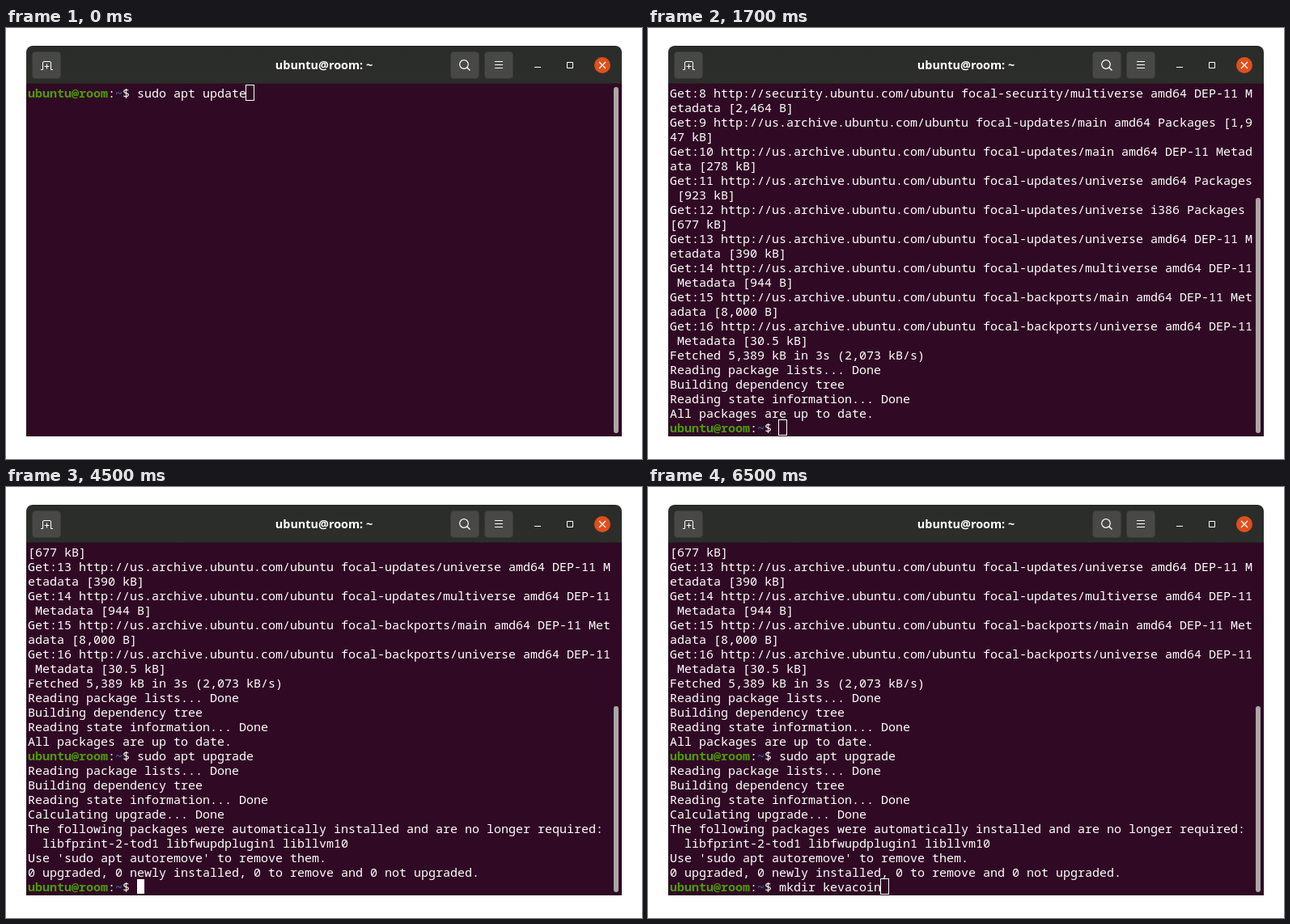
These frames come from a looping animation (786x533 px, 8 s). An HTML page:

```html
<!DOCTYPE html>
<html lang="en">
<head>
<meta charset="utf-8">
<title>Terminal</title>
<style>
  html, body { margin: 0; width: 100%; height: 100%; overflow: hidden; background: #fff; }
  svg { display: block; }
  text { white-space: pre; fill: #fff; }
  #rows text { font: 15px "Noto Sans Mono", "DejaVu Sans Mono", monospace; font-variant-ligatures: none; }
  #rows .user { fill: #4e9a06; font-weight: bold; }
  #rows .path { fill: #3465a4; font-weight: bold; }
  #title { font: bold 14.4px "Open Sans", "Noto Sans", sans-serif; }
  .button { fill: #484946; stroke: #3a3b39; }
  .icon { fill: none; stroke: #fff; }
</style>
</head>
<body>
<svg width="786" height="533" viewBox="0 0 786 533">
  <defs>
    <linearGradient id="bar" x2="0" y2="1">
      <stop offset="0" stop-color="#2a2c2a"/>
      <stop offset="1" stop-color="#2d2e2c"/>
    </linearGradient>
  </defs>
  <path fill="#300a24" d="M25 69H761V505H25Z"/>
  <path fill="url(#bar)" d="M25 69V30a8 8 0 0 1 8-8H753a8 8 0 0 1 8 8V69Z"/>
  <path fill="none" stroke="#242322" d="M33 22.5H753M25 68.5H761"/>
  <path fill="none" stroke="#230b1c" d="M25.5 69V504.5H760.5V69"/>
  <rect class="button" x="32.5" y="29.5" width="35" height="33" rx="4"/>
  <rect class="button" x="549.5" y="29.5" width="35" height="33" rx="4"/>
  <rect class="button" x="591.5" y="29.5" width="35" height="33" rx="4"/>
  <path class="icon" d="M43 51.5h2.5v-8.5q0-1.500 1.500-1.500h7q1.500 0 1.500 1.500v8.500h2.500M47.500 47.500h6M50.500 44.500v6"/>
  <circle class="icon" cx="566" cy="45" r="5.3" stroke-width="1.2"/>
  <path class="icon" stroke-width="1.3" d="M569.700 48.700L573.500 52.500"/>
  <path class="icon" d="M604 41.500h10M604 45.500h10M604 49.500h10M653 48.500h8M693.500 42.500h7v7h-7z"/>
  <circle cx="737" cy="46" r="10" fill="#e04f1b"/>
  <path class="icon" stroke-width="1.3" d="M733 42l8 8M741 42l-8 8"/>
  <text id="title" x="393" y="51" text-anchor="middle"></text>
  <g id="rows"></g>
  <rect id="cursor" stroke="#fff"/>
  <rect id="thumb" x="751" width="6" rx="3" fill="#aaa7a8"/>
</svg>
<script>
const LOOP = 8000, COLS = 80, ROWS = 24, LEFT = 27, TOP = 71, CELL = 9, LINE = 18;
const USER = 'ubuntu@room', PROMPT = '$ ';
const byId = id => document.getElementById(id);

const fetched = (n, suite, kind, size) => {
  const host = suite.startsWith('focal-security') ? 'security' : 'us.archive';
  return `Get:${n} http://${host}.ubuntu.com/ubuntu ${suite} ${kind} [${size}]`;
};
const meta = 'amd64 DEP-11 Metadata';
const checks = ['Reading package lists... Done', 'Building dependency tree', 'Reading state information... Done'];

const update = [
  fetched(8, 'focal-security/multiverse', meta, '2,464 B'),
  fetched(9, 'focal-updates/main', 'amd64 Packages', '1,947 kB'),
  fetched(10, 'focal-updates/main', meta, '278 kB'),
  fetched(11, 'focal-updates/universe', 'amd64 Packages', '923 kB'),
  fetched(12, 'focal-updates/universe', 'i386 Packages', '677 kB'),
  fetched(13, 'focal-updates/universe', meta, '390 kB'),
  fetched(14, 'focal-updates/multiverse', meta, '944 B'),
  fetched(15, 'focal-backports/main', meta, '8,000 B'),
  fetched(16, 'focal-backports/universe', meta, '30.5 kB'),
  'Fetched 5,389 kB in 3s (2,073 kB/s)',
  ...checks,
  'All packages are up to date.'
];
const upgrade = [
  ...update,
  PROMPT + 'sudo apt upgrade',
  ...checks,
  'Calculating upgrade... Done',
  'The following packages were automatically installed and are no longer required:',
  '  libfprint-2-tod1 libfwupdplugin1 libllvm10',
  "Use 'sudo apt autoremove' to remove them.",
  '0 upgraded, 0 newly installed, 0 to remove and 0 not upgraded.'
];

const steps = [
  { at: 0, log: [], typed: 'sudo apt update', thumb: 73 },
  { at: 500, log: update, typed: '', thumb: 210 },
  { at: 2500, log: update, typed: 'sudo apt upgrade', thumb: 210 },
  { at: 4500, log: upgrade, typed: '', thumb: 271, solid: true },
  { at: 6500, log: upgrade, typed: 'mkdir kevacoin', thumb: 271 }
];

const wrap = line => line.match(new RegExp(`.{1,${COLS}}`, 'g'));

function put(row, col, str, cls = '') {
  const el = document.createElementNS('http://www.w3.org/2000/svg', 'text');
  el.setAttribute('x', LEFT + col * CELL);
  el.setAttribute('y', TOP + 15 + row * LINE);
  el.setAttribute('class', cls);
  el.textContent = str;
  byId('rows').append(el);
}

function putRow(str, row) {
  if (!str.startsWith(PROMPT)) return put(row, 0, str);
  const n = USER.length;
  put(row, 0, USER, 'user');
  put(row, n, ':');
  put(row, n + 1, '~', 'path');
  put(row, n + 2, str);
}

function setBox(id, box) {
  for (const key in box) byId(id).setAttribute(key, box[key]);
}

function draw({ log, typed, thumb, solid }) {
  const rows = [...log, PROMPT + typed].flatMap(wrap).slice(-ROWS);
  byId('rows').replaceChildren();
  rows.forEach(putRow);
  const col = USER.length + 2 + PROMPT.length + typed.length;
  setBox('cursor', {
    x: LEFT + col * CELL + (solid ? 0.5 : -0.5),
    y: TOP + (rows.length - 1) * LINE + (solid ? 0.5 : -0.5),
    width: solid ? CELL - 1 : CELL + 1,
    height: solid ? LINE - 1 : LINE + 1,
    fill: solid ? '#fff' : 'none'
  });
  setBox('thumb', { y: thumb, height: 501 - thumb });
}

let shown;
const start = performance.now();
function tick() {
  const t = (performance.now() - start) % LOOP;
  const step = steps.findLast(s => s.at <= t);
  if (step !== shown) draw(shown = step);
  requestAnimationFrame(tick);
}
byId('title').textContent = USER + ': ~';
tick();
</script>
</body>
</html>
```
